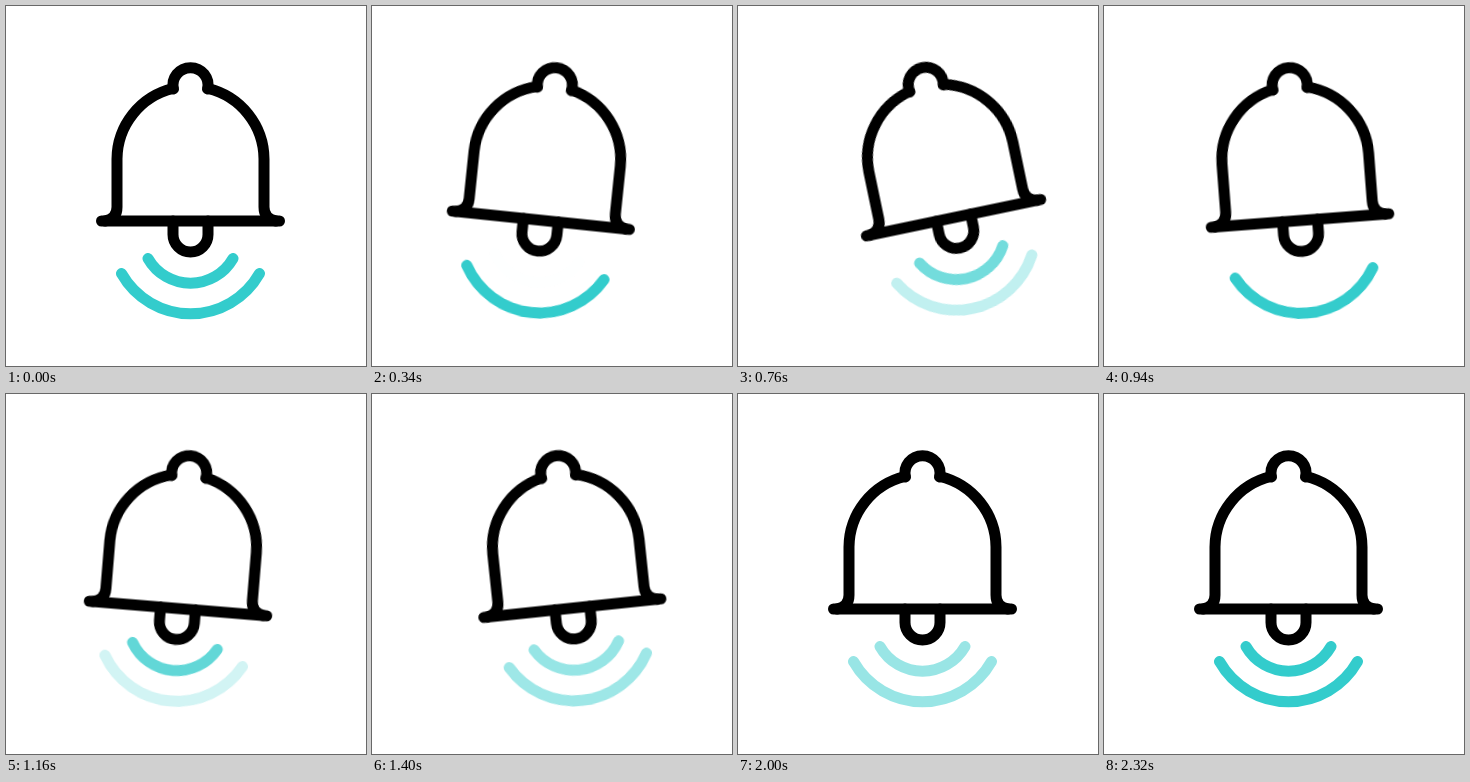
An HTML page without scripts for the animation above (2.4 s loop, 360 by 360 pixels).

```html
<!DOCTYPE html>
<html lang="en">
<head>
<meta charset="utf-8">
<title>Ringing bell</title>
<style>
  html, body { margin: 0; width: 100%; height: 100%; overflow: hidden; background: #fff; }
  svg { display: block; width: 100%; height: 100%; }
  path { fill: none; stroke-width: 11; stroke-linecap: round; stroke-linejoin: round; }
  .bell { stroke: #000; }
  .wave { stroke: #33cccc; }
  .swing, .wave {
    animation: 2400ms cubic-bezier(.333, 0, .667, 1) infinite;
  }
  .swing { transform-origin: 184px 63px; animation-name: swing; }
  .inner { animation-name: inner; }
  .outer { animation-name: outer; }

  /* one swing every 300 ms, from 200 ms to 1700 ms */
  @keyframes swing {
    0%, 8.333% { transform: rotate(0deg); }
    20.833% { transform: rotate(13deg); }
    33.333% { transform: rotate(-13deg); }
    45.833% { transform: rotate(6deg); }
    58.333% { transform: rotate(-6deg); }
    70.833%, 100% { transform: rotate(0deg); }
  }
  /* the waves take turns */
  @keyframes inner {
    0%, 8.333%, 27.083%, 52.292%, 77.083%, 96.25%, 100% { opacity: 1; }
    14.583%, 39.583%, 64.792%, 89.583% { opacity: 0; }
  }
  @keyframes outer {
    0%, 14.583%, 39.583%, 64.792%, 89.583%, 100% { opacity: 1; }
    27.083%, 52.292%, 77.083% { opacity: 0; }
  }
</style>
</head>
<body>
<svg viewBox="0 0 360 360">
  <g class="swing">
    <g class="bell">
      <path d="M167.5 83A17.5 17.2 0 1 1 201.5 83"/>
      <path d="M167 82.5A73 73 0 0 0 111 153V201Q111 213 99 215"/>
      <path d="M202 82.5A73 73 0 0 1 258 153V201Q258 213 270 215"/>
      <path d="M95.5 215H273.5"/>
      <path d="M167 215V228.500A17.500 17.500 0 0 0 202 228.500V215"/>
    </g>
    <path class="wave inner" d="M142 252.500A48.900 48.900 0 0 0 227 252.500"/>
    <path class="wave outer" d="M115.500 267.500A79.300 79.300 0 0 0 253.500 267.500"/>
  </g>
</svg>
</body>
</html>
```
